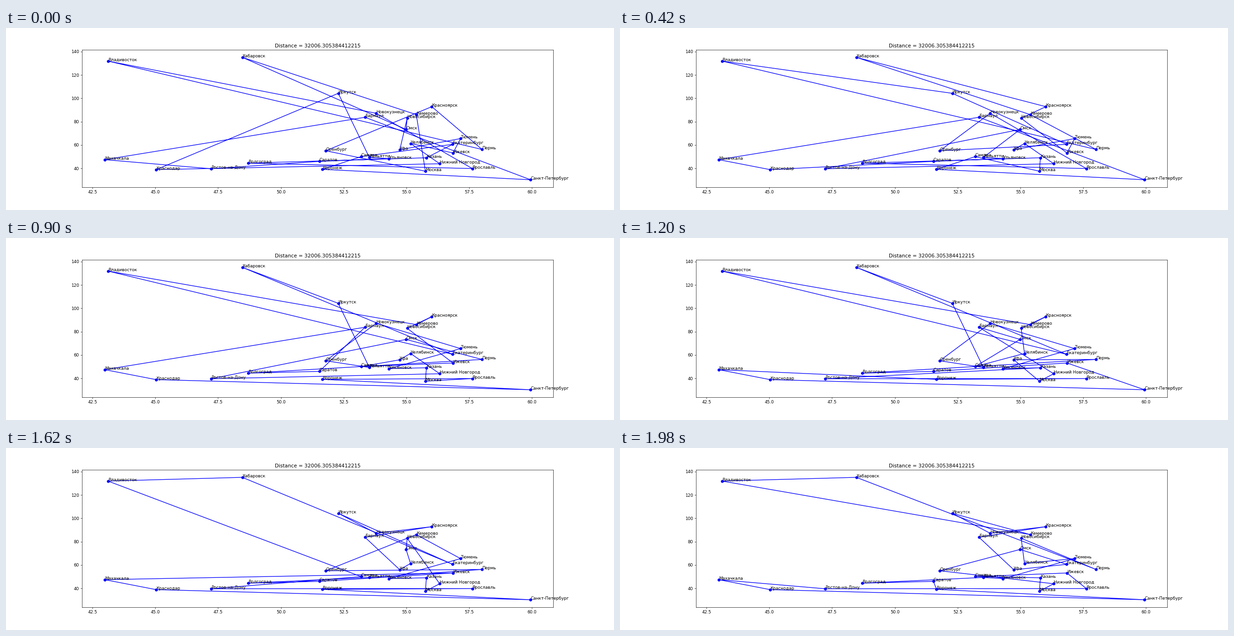
These frames come from a looping animation (1280 by 384 pixels, 2040 ms). A matplotlib script:

```python
from itertools import combinations
from math import hypot

import matplotlib.pyplot as plt
from matplotlib.animation import FuncAnimation

W, H, DPI = 1280, 384, 64
FRAMES, INTERVAL = 34, 60

# code: (name, latitude, longitude)
CITIES = {
    "VL": ("Владивосток", 43.116, 131.882),
    "KH": ("Хабаровск", 48.465, 135.060),
    "IR": ("Иркутск", 52.286, 104.281),
    "KR": ("Красноярск", 56.009, 92.852),
    "NK": ("Новокузнецк", 53.794, 87.214),
    "KE": ("Кемерово", 55.391, 86.047),
    "NS": ("Новосибирск", 55.028, 82.921),
    "BA": ("Барнаул", 53.348, 83.780),
    "OM": ("Омск", 54.985, 73.368),
    "CH": ("Челябинск", 55.160, 61.401),
    "TY": ("Тюмень", 57.153, 65.534),
    "EK": ("Екатеринбург", 56.839, 60.606),
    "PE": ("Пермь", 58.010, 56.234),
    "IZ": ("Ижевск", 56.853, 53.211),
    "UF": ("Уфа", 54.735, 55.958),
    "OR": ("Оренбург", 51.788, 55.102),
    "SM": ("Самара", 53.195, 50.107),
    "TO": ("Тольятти", 53.521, 49.390),
    "UL": ("Ульяновск", 54.308, 48.375),
    "KZ": ("Казань", 55.794, 49.112),
    "NN": ("Нижний Новгород", 56.324, 44.005),
    "YA": ("Ярославль", 57.622, 39.898),
    "MO": ("Москва", 55.754, 37.620),
    "VO": ("Воронеж", 51.659, 39.197),
    "SA": ("Саратов", 51.534, 46.034),
    "VG": ("Волгоград", 48.707, 44.517),
    "RO": ("Ростов-на-Дону", 47.223, 39.719),
    "KD": ("Краснодар", 45.035, 38.969),
    "MK": ("Махачкала", 42.985, 47.505),
    "SP": ("Санкт-Петербург", 59.939, 30.316),
}

# Tours the search passes through, keyed by step
STAGES = {
    0: "KD IR TO UL SA RO MK BA SP VO SM EK KZ VG YA "
       "NK VL PE KR OR MO KE KH OM NS UF TY IZ CH NN",
    7: "KD MK BA SP VO SM MO KZ VG YA NK OR EK IR VL "
       "PE KE KH KR NS IZ TY UF CH NN RO OM TO UL SA",
    15: "KD MK BA SA VG PE OM RO NN CH UF SM IZ NS KR "
        "KE VL EK KH IR TO OR NK TY UL KZ MO YA VO SP",
    20: "KD MK VO YA RO KZ UL TY NK OR TO IR KH EK VL "
        "KE KR NS CH SM OM BA NN MO UF PE VG SA IZ SP",
    24: "KD MK VO YA RO SM VL KH EK IR KE KR NS UF CH "
        "OM BA NN MO KZ UL TY NK OR TO PE VG SA IZ SP",
    30: "KD MK IZ YA RO SM KZ MO NN NS OM EK UF BA KR "
        "NK IR CH VL KH PE OR KE TY UL TO VG SA VO SP",
    33: "KD MK RO YA IZ SM KZ MO NN OR OM EK UF BA KR "
        "NK IR KE VL KH PE NS CH TY UL TO VG SA VO SP",
}


def edges(tour):
    return frozenset(frozenset(p) for p in zip(tour, tour[1:] + tour[:1]))


def length(tour):
    total = 0
    for a, b in zip(tour, tour[1:] + tour[:1]):
        (_, xa, ya), (_, xb, yb) = CITIES[a], CITIES[b]
        total += hypot(xa - xb, ya - yb)
    return total


def reversals(start, end):
    """Walk from one tour to another by reversing segments."""
    goal, path, seen = edges(end), [start], {edges(start)}
    while edges(path[-1]) != goal and len(path) < 30:
        t = path[-1]
        best = None
        for i, j in combinations(range(1, len(t) + 1), 2):
            new = t[:i] + t[i:j][::-1] + t[j:]
            links = edges(new)
            if links in seen:
                continue
            score = (len(links & goal), -length(new))
            if best is None or score > best[0]:
                best = score, new, links
        path.append(best[1])
        seen.add(best[2])
    path[-1] = end
    return path


def all_tours():
    steps = sorted(STAGES)
    tours = [STAGES[0].split()]
    for a, b in zip(steps, steps[1:]):
        path = reversals(STAGES[a].split(), STAGES[b].split())
        n = b - a
        tours += [path[round(k * (len(path) - 1) / n)] for k in range(1, n + 1)]
    return tours


def limits(values, size):
    """Axis range with a 5% margin around the markers."""
    lo, hi = min(values), max(values)
    inner = size / 1.1 - 6 * DPI / 72
    pad = (size - inner) / 2 * (hi - lo) / inner
    return lo - pad, hi + pad


tours = all_tours()
xs = [c[1] for c in CITIES.values()]
ys = [c[2] for c in CITIES.values()]

fig, ax = plt.subplots(figsize=(W / DPI, H / DPI), dpi=DPI)
fig.subplots_adjust(left=0.125, right=0.9, bottom=0.125, top=0.88)
ax.set_xlim(limits(xs, 0.775 * W))
ax.set_ylim(limits(ys, 0.755 * H))
ax.set_xticks([42.5 + 2.5 * k for k in range(8)])
ax.set_yticks(range(40, 141, 20))
ax.set_title("Distance = 32006.305384412215")
ax.scatter(xs, ys, c="b")
for name, x, y in CITIES.values():
    ax.annotate(name, (x, y))
route, = ax.plot([], [], "b-")


def update(i):
    tour = tours[i]
    stops = [CITIES[c] for c in tour + tour[:1]]
    route.set_data([s[1] for s in stops], [s[2] for s in stops])
    return route,


anim = FuncAnimation(fig, update, frames=FRAMES, interval=INTERVAL,
                     repeat=True, repeat_delay=0)
plt.show()
```
